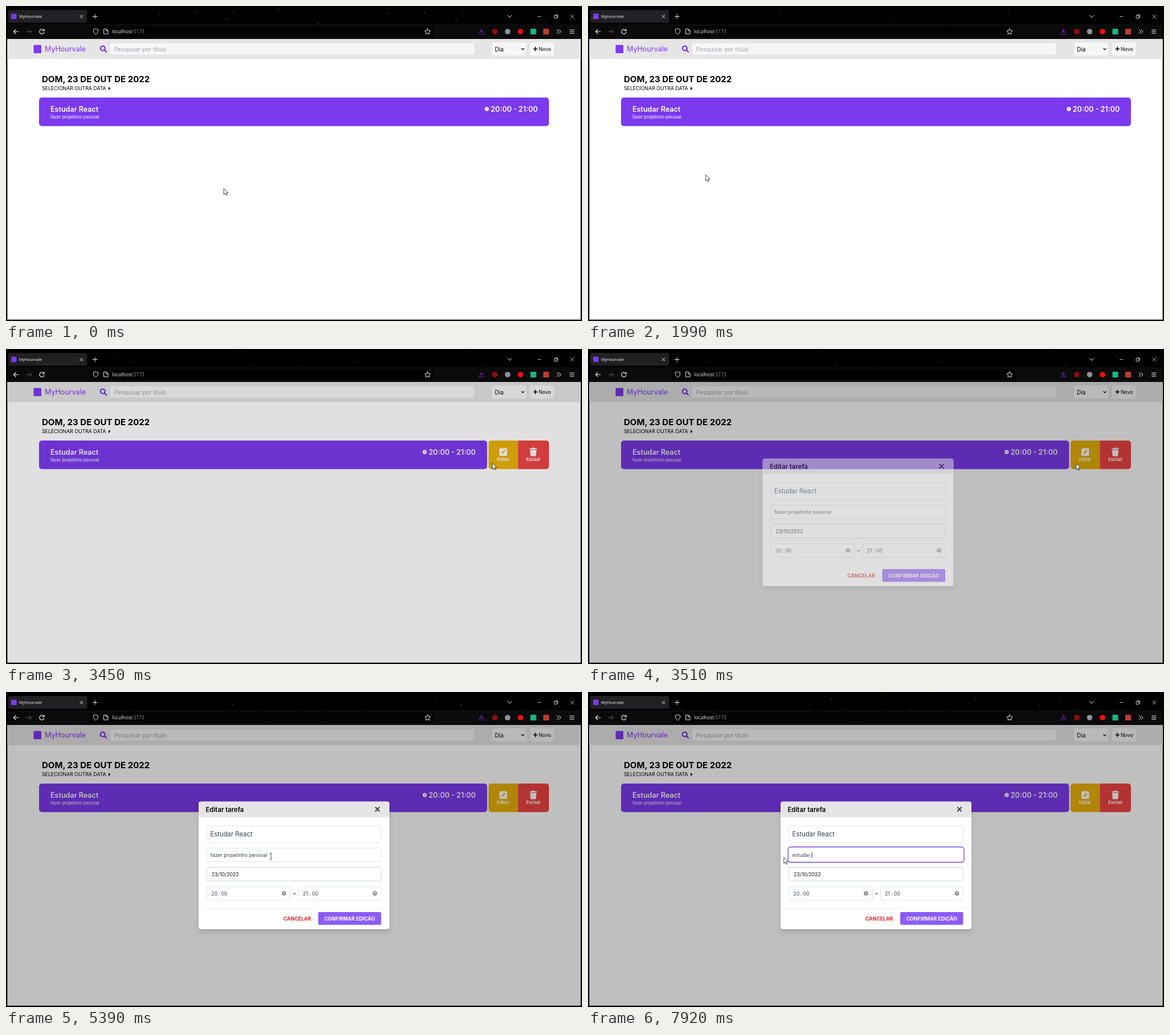
Write an HTML page that moves like this. It is 1011 px wide and 554 px high and loops after 8000 ms.

```html
<!DOCTYPE html>
<html lang="pt-BR">
<head>
<meta charset="utf-8">
<title>MyHourvale</title>
<style>
html, body { margin: 0; width: 100%; height: 100%; overflow: hidden; background: #000; }
svg { display: block; width: 100%; height: 100%; }
text { font-family: Inter, sans-serif; font-size: 8.78px; white-space: pre; }
.ui { font-family: "Open Sans", "Noto Sans", sans-serif; }
.xs { font-size: 7.53px; }
.base { font-size: 10.03px; }
.lg { font-size: 11.3px; }
.xl { font-size: 12.55px; }
.xxl { font-size: 15.05px; }
.semi { font-weight: 600; }
.bold { font-weight: 700; }
.end { text-anchor: end; }
.mid { text-anchor: middle; }
.line { fill: none; stroke: #e8e8e8; stroke-width: 1; stroke-linecap: round; stroke-linejoin: round; }
.field { fill: #fff; stroke: #dfe1e5; stroke-width: .8; filter: drop-shadow(0 .6px .6px #0002); }
.ink { fill: #374151; }
</style>
</head>
<body>
<svg viewBox="0 0 1011 554">
  <defs>
    <clipPath id="strip"><rect x="150" y="4" width="850" height="54"/></clipPath>
    <clipPath id="picked"><rect id="pickedBox" y="281" height="12"/></clipPath>
  </defs>

  <!-- browser window -->
  <rect width="1011" height="554"/>
  <g id="stars" clip-path="url(#strip)"></g>
  <rect x="3" y="32" width="1005" height="26" fill="#0d0d0e" opacity=".9"/>
  <rect x="4" y="7" width="138.500" height="22.500" rx="3" fill="#212123"/>
  <rect x="9" y="13.500" width="9.500" height="9.500" rx="1" fill="#7c3aed"/>
  <text class="ui" x="23" y="21" style="font-size:7.1px" fill="#f5f5f5">MyHourvale</text>
  <rect x="148" y="35.500" width="602" height="18.500" rx="2.500" fill="#020202"/>
  <g class="line">
    <path d="M130 16l5 5m0-5l-5 5M152.500 18.500h7.500m-3.750-3.750v7.500M880.500 16.500l3.500 3.500l3.500-3.500"/>
    <path d="M933.500 18.500h5.500M962.500 17h4.500v4.500h-4.500zM964 17v-1.500h4.500v4.500h-1.500M991 15.500l6 6m0-6l-6 6" stroke-width=".8"/>
    <path d="M22 45h-8.500m3.500-3.500l-3.500 3.500l3.500 3.500" stroke-width="1.200"/>
    <path d="M36 45h8.500m-3.500-3.500l3.500 3.500l-3.500 3.500" stroke="#66666a"/>
    <path d="M66.500 43a4.100 4.100 0 1 0 .4 3.200M67 40.500v3h-3" stroke-width="1.200"/>
    <path d="M157.500 40l4.200 1.500c.3 4-1.200 6.700-4.200 8.200c-3-1.500-4.500-4.200-4.200-8.200z"/>
    <path d="M172 40.500h4l3 3v5.500h-7zM176 40.500v3h3"/>
    <path d="M740 40l1.500 3.200l3.500.5l-2.500 2.400l.6 3.500l-3.100-1.700l-3.100 1.700l.6-3.500l-2.500-2.400l3.500-.5z"/>
    <path d="M834.500 40v6m-2.500-2.500l2.500 2.500l2.500-2.500M830.500 46.500v2.500h8v-2.500" stroke="#7b19c9" stroke-width="1.200"/>
    <path d="M967 41.500l3 3.500l-3 3.500m4-7l3 3.500l-3 3.500M989.500 42h7.500m-7.500 3h7.500m-7.500 3h7.500"/>
  </g>
  <text class="ui" x="186.400" y="48" style="font-size:8.4px" fill="#ededed">localhost<tspan fill="#96969a">:5173</tspan></text>
  <circle cx="858" cy="45" r="4.800" fill="#930d12"/>
  <circle cx="880.500" cy="45" r="4.800" fill="#8b949b"/>
  <circle cx="903" cy="45" r="4.800" fill="#ee0f0f"/>
  <rect x="920.500" y="40" width="10" height="10" fill="#12b886"/>
  <rect x="943" y="40" width="10" height="10" fill="#bd3b31"/>

  <!-- page -->
  <rect x="2.400" y="58" width="1006.200" height="493.600" fill="#fff"/>
  <rect x="2.400" y="58" width="1006.200" height="35.300" fill="#e5e5e5"/>
  <rect x="48.500" y="68.500" width="13.500" height="14.500" rx="1.500" fill="#7c3aed"/>
  <text class="xl" x="68" y="80" fill="#7c3aed">MyHourvale</text>
  <g fill="none" stroke="#6d28d9" stroke-width="2">
    <circle cx="169.800" cy="74.500" r="4"/>
    <path d="M172.800 77.500l3.300 3.300" stroke-linecap="round"/>
  </g>
  <g fill="#f6f6f6">
    <rect x="183" y="65.500" width="638.500" height="20" rx="3"/>
    <rect x="853" y="64" width="60" height="23" rx="3"/>
    <rect x="920" y="64" width="42" height="23" rx="3"/>
  </g>
  <text class="base" x="190" y="79.500" fill="#a0a4ab">Pesquisar por título</text>
  <text class="base" x="858" y="79.500">Dia</text>
  <path d="M904.500 74.500l2.500 2.500l2.500-2.500" fill="none" stroke="#000" stroke-width="1.200"/>
  <path d="M925.500 75.500h7.500m-3.750-3.750v7.500" stroke="#000" stroke-width="1.600"/>
  <text x="935" y="79.300">Novo</text>
  <text class="xxl bold" x="63" y="134">DOM, 23 DE OUT DE 2022</text>
  <text x="63" y="148.300">SELECIONAR OUTRA DATA</text>
  <path d="M180 142l3.500 3l-3.500 3z"/>

  <rect id="card" x="58" y="161" height="50.300" rx="5" fill="#7c3aed"/>
  <g fill="#fff">
    <text class="xl semi" x="78" y="185.600">Estudar React</text>
    <text class="xs" x="78" y="198.200">fazer projetinho pessoal</text>
    <g id="hours">
      <circle cx="843.900" cy="181.200" r="3.600"/>
      <path d="M843.900 179v2.300l1.500 1" fill="none" stroke="#7c3aed" stroke-width=".8"/>
      <text class="xl semi end" x="933.300" y="185.600">20:00 - 21:00</text>
    </g>
  </g>
  <g id="actions" fill="#fff">
    <path d="M898.500 161h-46.500a5 5 0 0 0-5 5v40.300a5 5 0 0 0 5 5h46.500z" fill="#eab308"/>
    <path d="M898.500 161h49.500a5 5 0 0 1 5 5v40.300a5 5 0 0 1-5 5h-49.500z" fill="#ef4444"/>
    <rect x="866" y="174.500" width="13.500" height="13.500" rx="2"/>
    <path d="M869.500 184.500l.6-2.400l4.800-4.800l1.800 1.800l-4.800 4.800z" fill="#eab308"/>
    <path d="M919 174.800h3.500l.8-1.300h4.400l.8 1.300h3.500v1.700h-13zM920 177.500h11l-.7 9.800q-.1 1.200-1.300 1.200h-7q-1.200 0-1.300-1.200z"/>
    <text class="xs bold mid" x="872.500" y="196.800">Editar</text>
    <text class="xs bold mid" x="925.700" y="196.800">Excluir</text>
  </g>
  <rect id="shade" x="2.400" y="58" width="1006.200" height="493.600"/>

  <!-- edit dialog -->
  <g id="dialog">
    <rect x="338" y="193" width="335" height="224" rx="4" fill="#fff" style="filter:drop-shadow(0 5px 4px #0002)"/>
    <path d="M338 220v-23.500a4 4 0 0 1 4-4h327a4 4 0 0 1 4 4v23.500z" fill="#e5e5e5"/>
    <text class="lg semi" x="350.500" y="210.600">Editar tarefa</text>
    <path d="M648.800 203l6.400 6.400m0-6.400l-6.400 6.400" stroke="#3f3f46" stroke-width="2.100" stroke-linecap="round"/>
    <rect class="field" x="352.500" y="235.500" width="306" height="29" rx="3"/>
    <rect class="field" x="352.500" y="274.500" width="306" height="23.800" rx="3"/>
    <rect class="field" x="352.500" y="308.300" width="306" height="23.800" rx="2.500" style="stroke:#cbced4"/>
    <rect class="field" x="352.500" y="342.500" width="146.500" height="23.800" rx="3"/>
    <rect class="field" x="513.800" y="342.500" width="144.700" height="23.800" rx="3"/>
    <rect id="ring" x="351.200" y="272.500" width="308.800" height="27" rx="4.500" fill="#fff" stroke="#7440d8" stroke-width="1.300"/>
    <text class="lg ink" x="358.500" y="254.200">Estudar React</text>
    <text class="ink" id="note" x="358.700" y="290"></text>
    <g clip-path="url(#picked)">
      <rect x="358.700" y="281" width="102" height="12" fill="#0078d7"/>
      <text x="358.700" y="290" fill="#fff">fazer projetinho pessoal</text>
    </g>
    <path id="caret" d="M0 281.500v10.500" stroke="#222" stroke-width=".9"/>
    <text x="361" y="323.800" fill="#111">23/10/2022</text>
    <g class="ink">
      <text x="360.300" y="357.700">20</text><text x="372.800" y="357.700">:</text><text x="377.600" y="357.700">00</text>
      <text x="521" y="357.700">21</text><text x="532.200" y="357.700">:</text><text x="537" y="357.700">00</text>
    </g>
    <path d="M504 354.800h4.800" stroke="#333" stroke-width="1.200"/>
    <g fill="#838387">
      <circle cx="487.800" cy="354.200" r="3.800"/>
      <circle cx="647.600" cy="354.200" r="3.800"/>
    </g>
    <path d="M486.300 352.700l3 3m0-3l-3 3M646.100 352.700l3 3m0-3l-3 3" stroke="#fff" stroke-width="1.100"/>
    <path d="M345 381.300h321.500" stroke="#e5e7eb" stroke-width=".8"/>
    <text class="bold" x="486.700" y="401.700" fill="#dc2626">CANCELAR</text>
    <rect x="548" y="387" width="110.500" height="22.500" rx="2.500" fill="#8b5cf6"/>
    <text class="bold mid" x="603.200" y="401.700" fill="#fff">CONFIRMAR EDIÇÃO</text>
  </g>

  <path id="arrow" d="M.3 0v10.600l2.500-2.300l1.700 3.800l1.700-.8l-1.700-3.700h3.500z" fill="#fff" stroke="#111" stroke-width=".8"/>
  <path id="beam" d="M-2-5h1.200q.8 0 .8.800q0-.8.800-.8h1.200M0-4.200v9.200M-2 5.800h1.200q.8 0 .8-.8q0 .8.800.8h1.200" fill="none" stroke="#222" stroke-width=".8"/>
</svg>
<script>
const LOOP = 8000, STEP = 90, TILE = 402;
const $ = id => document.getElementById(id);
const set = (id, attrs) => { for (const k in attrs) $(id).setAttribute(k, attrs[k]); };
const show = (id, on) => { $(id).style.display = on ? '' : 'none'; };

// Pointer stops: [step, x, y]
const pointer = [
  [0, 382, 321], [4, 470, 470], [8, 605, 99], [12, 620, 255], [16, 420, 330], [22, 206, 297],
  [26, 420, 342], [31, 727, 243], [35, 842, 198], [39, 856.500, 201.500], [46, 854, 204],
  [53, 620, 258], [60, 465, 288.500], [66, 462, 289], [75, 347, 290], [77, 343.500, 291], [90, 343.500, 291]
];

// Monotone easing between stops avoids overshoot
function pointerAt(n) {
  const i = Math.max(1, pointer.findIndex(p => p[0] > n));
  const [a, b] = [pointer[i - 1], pointer[i]];
  const u = (n - a[0]) / (b[0] - a[0]);
  const k = u * .6 + u * u * (3 - 2 * u) * .4;
  return [a[1] + (b[1] - a[1]) * k, a[2] + (b[2] - a[2]) * k];
}

let seed = 11;
const random = () => (seed = (seed * 16807) % 2147483647) / 2147483647;
const bright = [[270, 13], [333, 12], [399, 12], [477, 8], [547, 30], [388, 23]];
const stars = Array.from({ length: 24 }, (_, i) => {
  const [x, y] = bright[i] || [150 + random() * TILE, 4 + random() * 50];
  const dots = [-1, 0, 1, 2].map(k => {
    const dot = document.createElementNS('http://www.w3.org/2000/svg', 'circle');
    dot.setAttribute('cx', x + k * TILE);
    dot.setAttribute('r', i < 6 ? .8 : .6);
    dot.setAttribute('fill', i % 5 ? '#777' : '#a66');
    return $('stars').appendChild(dot);
  });
  return { dots, y, speed: 1 + random() * 3, phase: i < 6 ? 1.2 : random() * 6.3, rate: .5 + random() };
});

function drawStars(s) {
  for (const { dots, y, speed, phase, rate } of stars) {
    for (const dot of dots) {
      dot.setAttribute('cy', y);
      dot.setAttribute('transform', `translate(${s * speed} 0)`);
      dot.setAttribute('opacity', Math.max(.1, Math.sin(phase + s * rate)));
    }
  }
}

function drawNote(n) {
  const typed = 'estudar '.slice(0, Math.max(0, Math.floor((n - 77) * .8)));
  const focused = n >= 64;
  $('note').textContent = typed || 'fazer projetinho pessoal';
  show('ring', focused);
  const [x] = pointerAt(n);
  const from = Math.max(358.700, x);
  const selecting = n >= 67 && !typed;
  set('pickedBox', { x: from, width: selecting ? Math.max(0, 460 - from) : 0 });
  show('caret', focused && !selecting);
  set('caret', { transform: `translate(${359 + $('note').getComputedTextLength()} 0)` });
}

function draw(t) {
  const n = Math.floor((t + 10) / STEP);
  drawStars(n * STEP / 1000);

  const open = n >= 30;
  set('card', { width: open ? 786.500 : 895 });
  set('hours', { transform: `translate(${open ? -109 : 0} 0)` });
  set('actions', { opacity: open ? Math.min(1, .25 * (n - 29)) : 0 });

  set('shade', { opacity: n < 38 ? 0 : n < 39 ? .12 : .25 });
  const [alpha, shift] = n < 39 ? [0, -50] : n < 40 ? [.5, -31.500] : n < 41 ? [.92, -5] : [1, 0];
  set('dialog', { opacity: alpha, transform: `translate(${shift} 0)` });
  drawNote(n);

  const beam = n >= 58 && n < 76;
  show('beam', beam);
  show('arrow', !beam);
  set(beam ? 'beam' : 'arrow', { transform: `translate(${pointerAt(n)})` });
}

const start = performance.now();
function tick() {
  draw((performance.now() - start) % LOOP);
  requestAnimationFrame(tick);
}
tick();
</script>
</body>
</html>
```
